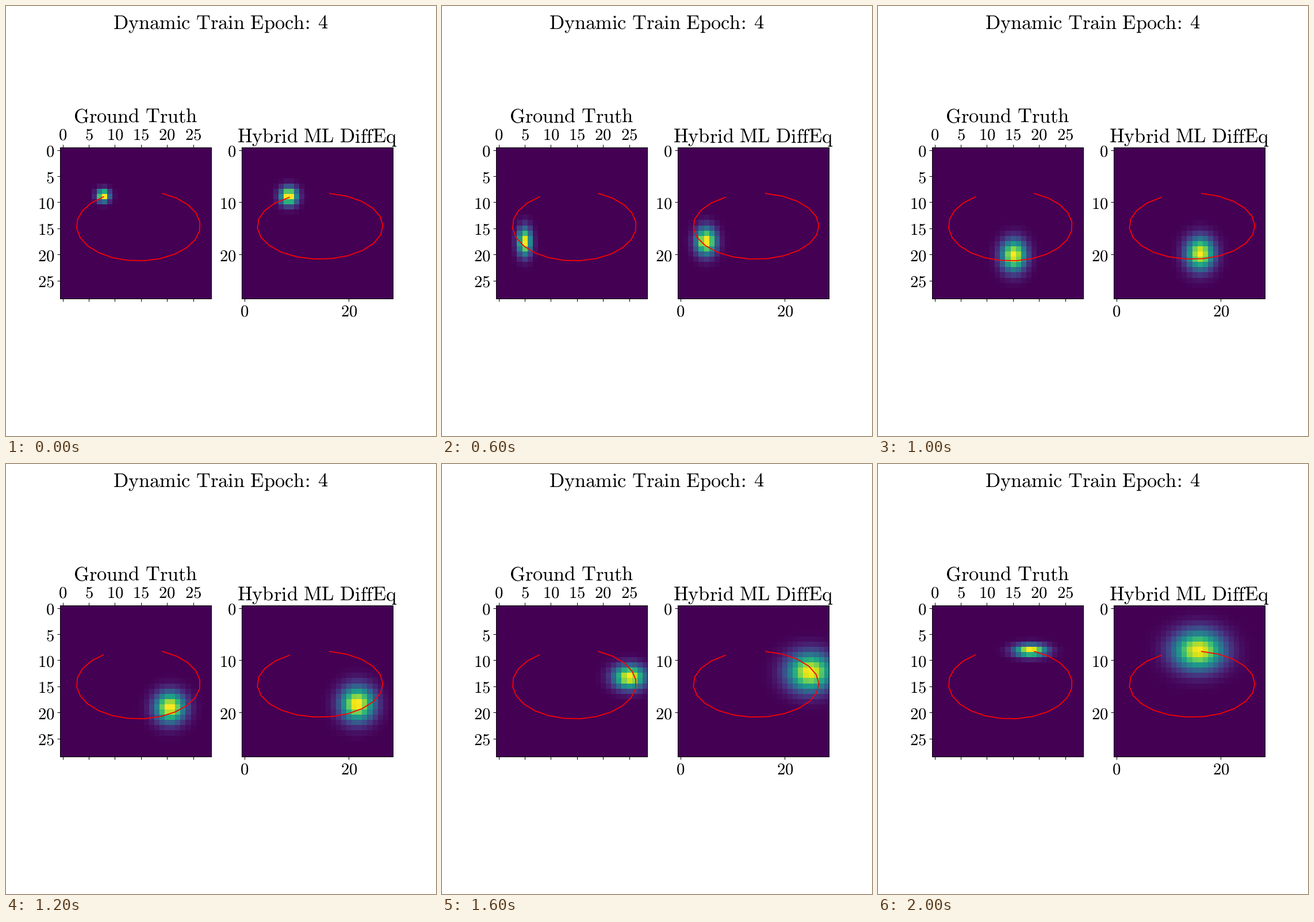
These frames come from a looping animation (748x748 px, 2.1 s). A matplotlib script:

```python
import numpy as np
import matplotlib.pyplot as plt
from matplotlib.animation import FuncAnimation

SIZE, DPI = 748, 100
CELLS, STEPS = 29, 21
MID = (CELLS - 1) / 2
TITLE_PT, TICK_PT = 24.8, 20.7

plt.rcParams.update({"mathtext.fontset": "cm", "text.hinting": "none",
                     "axes.linewidth": 0.75})

step = np.arange(STEPS)
t = step / (STEPS - 1)
rows, cols = np.mgrid[:CELLS, :CELLS]


def roman(text):
    return r"$\mathrm{" + text.replace(" ", r"\ ") + "}$"


def orbit(start, turn, cy, rx, ry):
    """Points on an ellipse, one per step, at a constant turn in degrees."""
    a = np.radians(start + turn * step)
    return 14.5 - rx * np.cos(a), cy + ry * np.sin(a)


def rise(low, gain, rate, middle):
    return low + gain / (1 + np.exp(-rate * (t - middle)))


def arch(low, gain, half_turns):
    return low + gain * np.sin(np.pi * half_turns * t)


class Panel:
    def __init__(self, ax, path, sx, sy):
        # The blob runs on a slightly smaller orbit than the drawn curve.
        self.cx, self.cy = (MID + 0.935 * (p - 14.5) for p in path)
        self.sx, self.sy = sx, sy
        self.image = ax.imshow(self.blob(0), cmap="viridis", vmin=0, vmax=1)
        ax.plot(*path, color="red", lw=1.25)
        ax.set(xlim=(-0.5, CELLS - 0.5), ylim=(CELLS - 0.5, -0.5))

    def blob(self, i):
        z = np.exp(-((cols - self.cx[i]) / self.sx[i]) ** 2 / 2
                   - ((rows - self.cy[i]) / self.sy[i]) ** 2 / 2)
        return z / z.max()

    def show(self, i):
        self.image.set_data(self.blob(i))
        return self.image


def set_ticks(ax, xs, ys):
    ax.set_xticks(xs, [roman(str(v)) for v in xs])
    ax.set_yticks(ys, [roman(str(v)) for v in ys])
    ax.tick_params(labelsize=TICK_PT, width=0.75)


fig, (left, right) = plt.subplots(
    1, 2, figsize=(SIZE / DPI, SIZE / DPI), dpi=DPI, facecolor="white")
fig.subplots_adjust(left=0.1257, right=0.9004, bottom=0.11, top=0.88,
                    wspace=0.2)

panels = [
    Panel(left, orbit(-55.6, 15.13, 14.5, 11.85, 6.72),
          rise(0.82, 1.24, 18, 0.47), arch(0.8, 1.22, 1)),
    Panel(right, orbit(-60.7, 16.1, 14.57, 12.03, 6.33),
          rise(1.1, 2.3, 7, 0.62), arch(1.15, 1.35, 0.5)),
]

set_ticks(left, range(0, 26, 5), range(0, 26, 5))
left.tick_params(axis="x", top=True, bottom=True, labeltop=True,
                 labelbottom=False, pad=2.2)
set_ticks(right, [0, 20], [0, 10, 20])
right.tick_params(axis="x", pad=2.2)

left.set_title(roman("Ground Truth"), fontsize=TITLE_PT, y=1, pad=30.5)
right.set_title(roman("Hybrid ML DiffEq"), fontsize=TITLE_PT, y=1, pad=6)
fig.text(373 / SIZE, 1 - 40 / SIZE, roman(r"Dynamic Train Epoch\!:\:4"),
         fontsize=TITLE_PT, ha="center", va="baseline")


def update(i):
    return [p.show(i) for p in panels]


anim = FuncAnimation(fig, update, frames=STEPS, interval=100,
                     repeat=True, repeat_delay=0)
plt.show()
```
